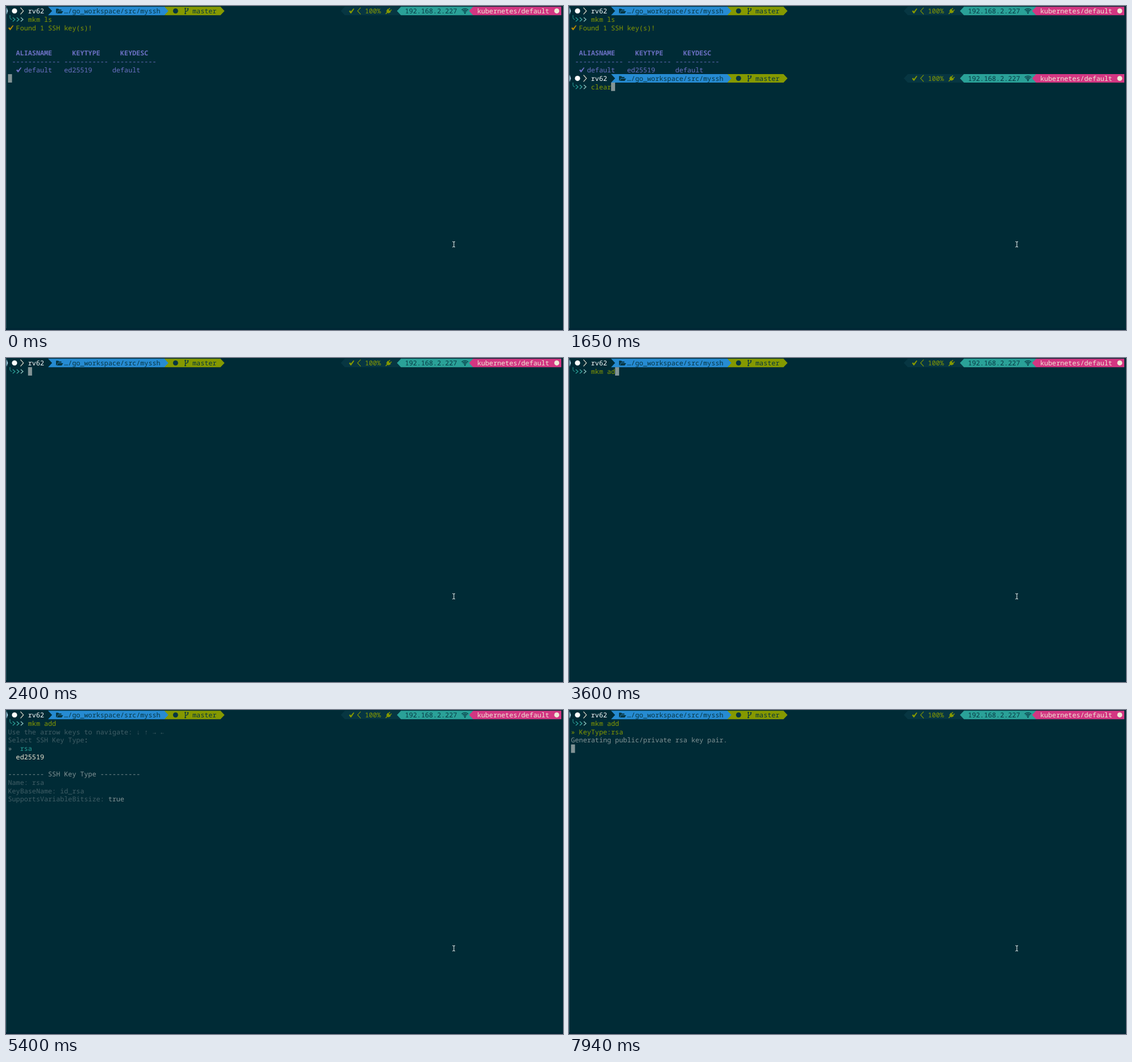
Animation of 980 by 571 pixels, one loop 8 s. Source, as an HTML page with a canvas:

```html
<!DOCTYPE html>
<html lang="en">
<head>
<meta charset="utf-8">
<title>Terminal session</title>
<style>
  html, body { margin: 0; width: 100%; height: 100%; overflow: hidden; background: #002b36; }
  canvas { display: block; }
</style>
</head>
<body>
<canvas id="stage" width="980" height="571"></canvas>
<script>
const ctx = document.getElementById('stage').getContext('2d');
const LOOP = 8000, CELL = 7.055, LINE = 14.85;
const FONT = '11.76px "Noto Sans Mono", "DejaVu Sans Mono", monospace';
const C = {
  bg: '#002b36', dark: '#073642', dim: '#405e66', grey: '#839496', pale: '#eee8d5',
  blue: '#268bd2', teal: '#2aa198', olive: '#859900', amber: '#b58900',
  violet: '#6c71c4', pink: '#d33682', red: '#dc322f'
};
const colX = col => 3.5 + col * CELL;
const rowY = row => 1.3 + row * LINE;

// Terminal text: one glyph per cell.
function text(row, col, str, color, bold) {
  ctx.font = (bold ? 'bold ' : '') + FONT;
  ctx.fillStyle = color;
  [...str].forEach((ch, i) => {
    if (ch !== ' ') ctx.fillText(ch, colX(col + i), rowY(row) + 11.6);
  });
}

function cursor(row, col) {
  ctx.fillStyle = C.grey;
  ctx.fillRect(colX(col), rowY(row), CELL, LINE);
}

function poly(color, ...points) {
  ctx.fillStyle = color;
  ctx.beginPath();
  points.forEach(p => ctx.lineTo(...p));
  ctx.fill();
}

function line(color, width, ...points) {
  ctx.strokeStyle = color;
  ctx.lineWidth = width;
  ctx.beginPath();
  points.forEach(p => ctx.lineTo(...p));
  ctx.stroke();
}

function dot(color, x, y, r) {
  ctx.fillStyle = color;
  ctx.beginPath();
  ctx.arc(x, y, r, 0, 7);
  ctx.fill();
}

function check(x, y, color) {
  poly(color, [x, y + 8], [x + 1.8, y + 6.5], [x + 3.4, y + 8.3], [x + 7.8, y + 3],
    [x + 9.3, y + 3.6], [x + 3.9, y + 11.6], [x + 2.6, y + 11.6]);
}

// Bar segment; a tip is one cell wide and points outwards.
function segment(y, from, to, color, leftTip, rightTip) {
  const a = colX(from), b = colX(to), mid = y + LINE / 2, end = y + LINE;
  poly(color, [a, y], [b, y], [b + (rightTip ? CELL : 0), mid], [b, end],
    [a, end], [a - (leftTip ? CELL : 0), mid]);
}

function folder(y) {
  poly(C.dark, [88, y + 11.5], [88, y + 3.5], [92, y + 3.5], [93.2, y + 5], [97.5, y + 5],
    [97.5, y + 7], [91.5, y + 7], [89, y + 11.5]);
  poly(C.dark, [91.8, y + 7.7], [100.5, y + 7.7], [98, y + 12], [89.4, y + 12]);
}

function branch(y) {
  line(C.dark, 1.2, [315.5, y + 3], [315.5, y + 12.5]);
  line(C.dark, 1.2, [320, y + 3], [320, y + 6.5], [315.5, y + 9]);
  for (const [x, dy] of [[315.5, 3.2], [320, 3.8], [315.5, 12]]) dot(C.dark, x, y + dy, 1.3);
}

function plug(y) {
  ctx.save();
  ctx.translate(673, y + 7.7);
  ctx.rotate(Math.PI / 4);
  poly(C.olive, [-4, -2], [4, -2], [3, 2.2], [1, 3.5], [-1, 3.5], [-3, 2.2]);
  for (const x of [-2, 2]) line(C.olive, 1.5, [x, -2], [x, -5.5]);
  line(C.olive, 1.5, [0, 3], [0, 7]);
  ctx.restore();
}

function wifi(y) {
  ctx.strokeStyle = C.dark;
  ctx.lineWidth = 1.4;
  for (const r of [3, 5.6, 8.2]) {
    ctx.beginPath();
    ctx.arc(807.5, y + 11.5, r, -Math.PI * .75, -Math.PI * .25);
    ctx.stroke();
  }
  dot(C.dark, 807.5, y + 11.2, 1.2);
}

function promptBar(row) {
  const y = rowY(row), mid = y + LINE / 2;
  segment(y, 39, 53, C.olive, false, true);
  segment(y, 10, 39, C.blue, false, true);
  segment(y, 0, 10, C.bg, false, true);
  poly('#a9cfe2', [1, y + 1], [3.4, mid], [1, y + LINE - 1]);
  dot('#fff', 15, mid, 4.6);
  line(C.pale, 1.1, [25.5, y + 1.5], [30.7, mid], [25.5, y + 13.3]);
  text(row, 5, 'rv62', '#fff');
  folder(y);
  text(row, 14, '…/go_workspace/src/myssh', C.dark);
  dot(C.dark, 298.3, mid, 4.5);
  branch(y);
  text(row, 46, 'master', C.dark);

  segment(y, 84, 98, C.dark, true);
  segment(y, 98, 116, C.teal, true);
  segment(y, 116, 138, C.pink, true);
  check(603.5, y, C.olive);
  line(C.olive, 1.1, [624, y + 1.5], [618.6, mid], [624, y + 13.3]);
  text(row, 89, '100%', C.olive);
  plug(y);
  text(row, 99, '192.168.2.227', C.dark);
  wifi(y);
  text(row, 117, 'kubernetes/default', C.pale);
  dot(C.pale, 969, mid, 4.4);
}

function chevron(row, col, color, width = 1.3) {
  const x = colX(col) + 1.3, y = rowY(row);
  line(color, width, [x, y + 4], [x + 4, y + 7.6], [x, y + 11.2]);
}

function prompt(row, command, color) {
  promptBar(row);
  const y = rowY(row + 1);
  ctx.strokeStyle = C.teal;
  ctx.lineWidth = 1;
  ctx.beginPath();
  ctx.moveTo(7, y);
  ctx.lineTo(7, y + 4.5);
  ctx.quadraticCurveTo(7, y + 7.5, 10.5, y + 7.5);
  ctx.stroke();
  [C.teal, '#43aaa3', '#8fc5c0'].forEach((c, i) => chevron(row + 1, i + 1, c));
  text(row + 1, 5, command, color);
}

// Shell input is plain at one letter, red while unknown, olive once it is a command.
function shellInput(row, typed, known) {
  const color = typed.startsWith(known) ? C.olive : typed.length > 1 ? C.red : C.grey;
  prompt(row, typed, color);
  cursor(row + 1, 5 + typed.length);
}

function keyTable() {
  check(4, rowY(2), C.amber);
  text(2, 2, 'Found 1 SSH key(s)!', C.olive);
  text(5, 2, 'ALIASNAME', C.violet, true);
  text(5, 16, 'KEYTYPE', C.violet, true);
  text(5, 28, 'KEYDESC', C.violet, true);
  text(6, 1, '------------ ----------- -----------', C.violet);
  check(18, rowY(7), C.violet);
  text(7, 4, 'default   ed25519     default', C.violet);
}

function field(row, label, value, labelColor, iconColor) {
  chevron(row, 0, iconColor, 1.7);
  chevron(row, 1, iconColor, 1.7);
  text(row, 3, label, labelColor);
  text(row, 4 + label.length, value, C.grey);
}

function keyTypeMenu() {
  text(2, 0, 'Use the arrow keys to navigate: ↓ ↑ → ←', C.dim);
  text(3, 0, 'Select SSH Key Type', C.dim);
  text(3, 19, ':', C.grey);
  text(4, 0, '»', C.grey);
  text(4, 3, 'rsa', C.teal);
  text(5, 2, 'ed25519', C.pale);
  text(7, 0, '--------- SSH Key Type ----------', C.grey);
  text(8, 0, 'Name: rsa', C.dim);
  text(9, 0, 'KeyBaseName: id_rsa', C.dim);
  text(10, 0, 'SupportsVariableBitsize:', C.dim);
  text(10, 25, 'true', C.grey);
}

// Each key is [time, number of letters shown].
function typedAt(t, str, keys) {
  const key = keys.filter(([time]) => t >= time).pop();
  return str.slice(0, key ? key[1] : 0);
}

function session(t) {
  if (t < 1800) {
    prompt(0, 'mkm ls', C.olive);
    keyTable();
    if (t < 450) cursor(8, 0);
    else shellInput(8, typedAt(t, 'clear', [[1050, 1], [1200, 3], [1500, 4], [1650, 5]]), 'clear');
  } else if (t < 2400) {
    cursor(0, 0);
  } else if (t < 4050) {
    const keys = [[2700, 1], [2850, 2], [3150, 4], [3300, 5], [3600, 6], [3900, 7]];
    shellInput(0, typedAt(t, 'mkm add', keys), 'mkm');
  } else {
    prompt(0, 'mkm add', C.olive);
    if (t < 5400) {
      const alias = typedAt(t, 'test', [[4650, 1], [4800, 2], [4950, 3], [5100, 4]]);
      field(2, 'AliasName:', alias, alias ? C.teal : C.red, alias ? C.blue : C.red);
      cursor(2, 14 + alias.length);
    } else if (t < 6600) {
      keyTypeMenu();
    } else {
      text(2, 0, '» KeyType:rsa', C.olive);
      if (t < 7940) {
        const editing = t < 7190;
        field(3, 'BitSize(default:2048):', '2048', editing ? C.teal : C.dim, C.blue);
        if (editing) cursor(3, 30);
      } else {
        text(3, 0, 'Generating public/private rsa key pair.', C.grey);
        cursor(4, 0);
      }
    }
  }
}

function pointer() {
  for (const s of [-1, 1]) {
    line('#dfe6e6', 1.1, [785.5, 420 + s * 5], [788, 420 + s * 4], [788, 420]);
    line('#dfe6e6', 1.1, [790, 420 + s * 5], [788, 420 + s * 4]);
  }
}

function draw(now) {
  ctx.fillStyle = C.bg;
  ctx.fillRect(0, 0, 980, 571);
  ctx.fillStyle = '#24505b';
  ctx.fillRect(0, 0, 1, 571);
  ctx.fillStyle = '#002635';
  ctx.fillRect(0, 568, 980, 3);
  session(now % LOOP);
  pointer();
  requestAnimationFrame(draw);
}

ctx.textRendering = 'geometricPrecision';
draw(0);
</script>
</body>
</html>
```
